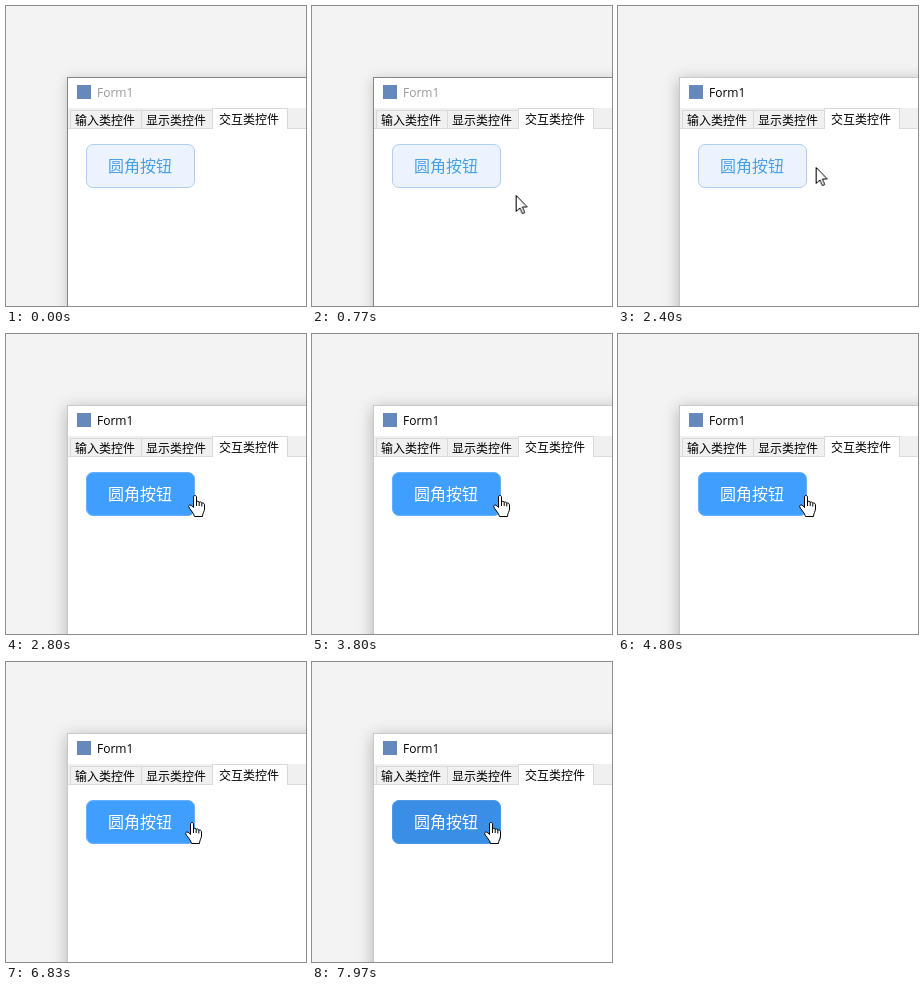
An HTML page for the animation above (8 s loop, 300x300 px).

```html
<!DOCTYPE html>
<html lang="zh">
<head>
<meta charset="utf-8">
<title>Form1</title>
<style>
  html, body { margin: 0; width: 100%; height: 100%; overflow: hidden; }
  body { position: relative; background: #f3f3f3; font: 12px/16px "Noto Sans CJK SC", "Noto Sans CJK", sans-serif; color: #000; }
  body * { position: absolute; box-sizing: border-box; white-space: nowrap; }

  .window, .title, .button, .arrow, .hand { animation: 8s step-end infinite; }

  .window { left: 61px; top: 71px; width: 300px; height: 300px; background: #fff; border: 1px solid; animation-name: activate; }
  .icon { left: 71px; top: 79px; width: 14px; height: 14px; background: #6688bd; }
  .title { left: 91px; top: 79px; font-family: "Open Sans", sans-serif; animation-name: title; }

  .strip { left: 62px; top: 102px; width: 238px; height: 21px; background: #f0f0f0; border-bottom: 1px solid #dcdcdc; }
  .tab { top: 104px; width: 72px; height: 18px; padding: 1px 0 0 4px; border: 1px solid #d9d9d9; border-bottom: 0; }
  .tab.selected { top: 102px; width: 76px; height: 21px; padding: 2px 0 0 6px; background: #fff; }

  .button { left: 80px; top: 138px; width: 109px; height: 44px; border: 1px solid; border-radius: 7px;
            font-size: 16px; line-height: 41px; padding-left: 21px; animation-name: button; }

  .cursor { left: 0; top: 0; animation: move 8s linear infinite; }
  svg { overflow: visible; fill: #fff; stroke: #000; stroke-linejoin: round; }
  .arrow { left: 0; top: 0; animation-name: arrow; }
  .hand { left: -6px; top: 0; animation-name: hand; }

  @keyframes activate {
    0% { border-color: #858585; box-shadow: 0 2px 12px rgba(0,0,0,.2); }
    12.5%, 100% { border-color: #c8c8c8; box-shadow: 0 3px 15px rgba(0,0,0,.27); }
  }
  @keyframes title {
    0% { color: #999; }
    12.5%, 100% { color: #000; }
  }
  @keyframes button {
    0%, 63.4% { background: #ecf3fe; border-color: #aecff0; color: #4ba1e6; }
    32.5%, 82.5% { background: #409eff; border-color: #66b0fb; color: #fff; }
    92%, 100% { background: #3a8ee6; border-color: #4c98e6; color: #fff; }
  }
  @keyframes arrow {
    0%, 63.4% { visibility: visible; }
    32.5%, 82.5%, 100% { visibility: hidden; }
  }
  @keyframes hand {
    0%, 63.4% { visibility: hidden; }
    32.5%, 82.5%, 100% { visibility: visible; }
  }
  @keyframes move {
    0%, .875% { transform: translate(190px, 302px); animation-timing-function: ease-out; }
    10.875% { transform: translate(204px, 186px); }
    13% { transform: translate(204px, 184px); animation-timing-function: ease-in-out; }
    19.625%, 21.25% { transform: translate(213px, 162px); }
    21.625% { transform: translate(211px, 161px); animation-timing-function: ease-out; }
    25.875% { transform: translate(202px, 161px); }
    28.75% { transform: translate(202px, 161px); animation-timing-function: ease-out; }
    35% { transform: translate(188px, 161px); }
    37.875% { transform: translate(187px, 161px); }
    62.5% { transform: translate(187px, 161px); animation-timing-function: ease-out; }
    66.625% { transform: translate(197px, 160px); }
    79.125% { transform: translate(197px, 160px); animation-timing-function: ease-out; }
    85.375% { transform: translate(185px, 160px); animation-timing-function: ease-out; }
    89.125%, 91.625% { transform: translate(179px, 160px); }
    93.75%, 100% { transform: translate(178px, 160px); }
  }
</style>
</head>
<body>
  <div class="window"></div>
  <div class="icon"></div>
  <div class="title">Form1</div>
  <div class="strip"></div>
  <div class="tab" style="left:64px">输入类控件</div>
  <div class="tab" style="left:135px">显示类控件</div>
  <div class="tab selected" style="left:206px">交互类控件</div>
  <div class="button">圆角按钮</div>
  <div class="cursor">
    <svg class="arrow" width="12" height="20">
      <path d="M.5.5V16.5L4.2 13 6.7 18.6 9 17.6 6.7 12H11.5Z"/>
    </svg>
    <svg class="hand" width="17" height="22">
      <path d="M5.5 12.5V2C5.5 0 8.5 0 8.5 2V7C8.5 5.9 11.2 6 11.2 7.5 11.2 6.5 13.8 6.7 13.8 8.4 13.8 7.6 16.5 7.8 16.5 9.8V14C16.5 16.5 14.5 18 14.5 21.5H6.5C6.2 18 .6 13.5.6 11.3 1 9.3 3.2 9.6 5.5 12.5Z"/>
      <path fill="none" d="M8.5 7V11M11.2 7.5V11M13.8 8.4V11.5"/>
    </svg>
  </div>
</body>
</html>
```
